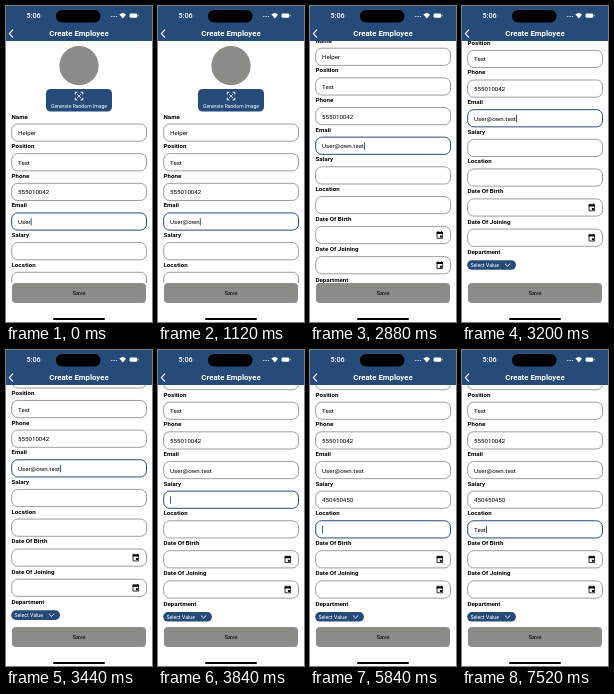
An HTML page that plays this animation: 146x316 px, repeating every 8 s.

```html
<!DOCTYPE html>
<html lang="en">
<head>
<meta charset="utf-8">
<title>Create Employee</title>
<style>
  html, body { margin: 0; width: 100%; height: 100%; overflow: hidden; background: #fff; }
  svg { display: block; width: 146px; height: 316px; font: 6.2px Roboto, sans-serif; }
  .label { font-weight: 700; }
  .box { fill: #fff; stroke: #858585; stroke-width: .8; }
  .box.focused { stroke: #264b78; stroke-width: 1; }
  .blue { fill: #264b78; }
  .gray { fill: #8b8b87; }
  .white { fill: #fff; }
  .line { fill: none; stroke: #fff; stroke-linecap: round; stroke-linejoin: round; }
</style>
</head>
<body>
<svg viewBox="0 0 146 316">
  <defs>
    <clipPath id="view"><rect y="35" width="146" height="242"/></clipPath>
    <g id="calendar">
      <path d="M-2.8-2.8h5.6v6h-5.6z" fill="none" stroke="#000" stroke-width=".8"/>
      <path d="M-3.2-3.2h6.4v2h-6.4zM-2.2-4h.9v1h-.9zM1.3-4h.9v1h-.9zM.1.4h2v2h-2z"/>
    </g>
  </defs>

  <g clip-path="url(#view)">
    <g id="form">
      <circle class="gray" cx="73" cy="59.7" r="19.6"/>
      <rect class="blue" x="40" y="83" width="66" height="22.5" rx="4.5"/>
      <g class="line" stroke-width="1">
        <path d="M69.2 88v-1.7h1.7M75.1 86.3h1.7V88M76.8 92.2v1.7h-1.7M70.9 93.9h-1.7v-1.7"/>
        <path d="M71.2 88.3l3.6 3.6M74.8 88.3l-3.6 3.6" stroke-width=".8"/>
      </g>
      <text class="white" x="73" y="102" font-size="5.1" text-anchor="middle">Generate Random Image</text>
    </g>
  </g>

  <rect class="gray" x="6" y="277" width="134" height="20" rx="4"/>
  <text x="73" y="289.3" text-anchor="middle">Save</text>
  <rect x="47" y="312" width="52" height="2" rx="1"/>

  <rect class="blue" width="146" height="35"/>
  <rect x="50" y="4" width="44.5" height="12.5" rx="6.2"/>
  <text class="white" x="20.5" y="12.4" font-size="7.2" font-weight="500">5:06</text>
  <g class="white">
    <circle cx="105.4" cy="10.6" r=".5"/><circle cx="107.1" cy="10.6" r=".5"/>
    <circle cx="108.8" cy="10.6" r=".5"/><circle cx="110.5" cy="10.6" r=".5"/>
    <path d="M113.4 8.6q3.4-3 6.8 0l-3.4 3.9z"/>
    <rect x="123.6" y="7.4" width="7.6" height="4.4" rx="1.2"/>
    <rect x="131.7" y="8.8" width=".7" height="1.6" rx=".3"/>
  </g>
  <path class="line" d="M6.7 24L3.3 27.6l3.4 3.6" stroke-width="1.1"/>
  <text class="white" x="73" y="30.2" font-size="7.8" font-weight="700" text-anchor="middle">Create Employee</text>
</svg>

<script>
const LOOP = 8000, FRAME = 80;
const form = document.getElementById('form');

function add(tag, attrs, text = '') {
  const node = document.createElementNS('http://www.w3.org/2000/svg', tag);
  for (const key in attrs) node.setAttribute(key, attrs[key]);
  node.textContent = text;
  return form.appendChild(node);
}

// y is the vertical centre of the label above each box
function addField(label, y, value = '') {
  add('text', { class: 'label', x: 5.5, y: y + 2.3 }, label);
  const box = add('rect', { class: 'box', x: 5.7, y: y + 7.8, width: 134.8, height: 17.2, rx: 6 });
  const text = add('text', { x: 12, y: y + 18.9 }, value);
  return { box, text, y };
}

const fields = ['Name', 'Position', 'Phone', 'Email', 'Salary', 'Location'].map((label, i) =>
  addField(label, 110.2 + i * 29.65, ['Helper', 'Test', '555010042'][i]));

[['Date Of Birth', 288.4], ['Date Of Joining', 318.6]].forEach(([label, y]) => {
  addField(label, y);
  add('use', { href: '#calendar', x: 129.8, y: y + 16.5 });
});

add('text', { class: 'label', x: 5.5, y: 351.6 }, 'Department');
add('rect', { class: 'blue', x: 5.2, y: 357.5, width: 48.8, height: 9.6, rx: 4.8 });
add('text', { class: 'white', x: 8.5, y: 364.2, 'font-size': 5.2 }, 'Select Value');
add('path', { class: 'line', d: 'M43.3 361.3l2.3 2.2 2.3-2.2', 'stroke-width': .9 });
const caret = add('rect', { class: 'blue', width: .9, height: 7.4 });

// Each session takes focus at `start`; `keys` are the times of further key presses
const sessions = [
  { field: fields[3], start: 0, value: 'User@own.test', typed: 4,
    keys: [320, 960, 1040, 1120, 1200, 1760, 1920, 2000, 2160] },
  { field: fields[4], start: 3840, value: '450450450', typed: 0,
    keys: [4240, 4320, 4400, 4560, 4720, 4800, 4880, 5040, 5120] },
  { field: fields[5], start: 5360, value: 'Test', typed: 0,
    keys: [7120, 7280, 7360, 7520] }
];

const scrollKeys = [[2640, 0], [2720, 16], [2800, 48], [2880, 75.8], [2960, 92], [3040, 100],
  [3120, 103.4], [3200, 103.3], [3280, 101], [3360, 98.8], [3440, 97.2], [3520, 96.2], [3680, 95.5]];
const caretKeys = [[1519, 1], [1520, 0], [1759, 0], [1760, 1],
  [6000, 1], [6160, 0], [6240, 0], [6320, .5], [6400, .5], [6480, 1]];

function interpolate(keys, t) {
  const i = keys.findIndex(([time]) => time > t);
  if (i < 0) return keys[keys.length - 1][1];
  if (i === 0) return keys[0][1];
  const [[t0, a], [t1, b]] = [keys[i - 1], keys[i]];
  return a + (b - a) * (t - t0) / (t1 - t0);
}

function render(t) {
  const active = sessions.filter(s => s.start <= t).pop();
  for (const s of sessions) {
    const count = s.typed + s.keys.filter(key => key <= t).length;
    s.field.text.textContent = s.value.slice(0, count);
    s.field.box.classList.toggle('focused', s === active);
  }
  const { text, y } = active.field;
  const width = text.textContent ? text.getComputedTextLength() : 0;
  caret.setAttribute('x', 12.1 + width);
  caret.setAttribute('y', y + 13);
  caret.setAttribute('opacity', interpolate(caretKeys, t));
  form.setAttribute('transform', `translate(0 ${-interpolate(scrollKeys, t)})`);
}

const begin = performance.now();
function tick() {
  const t = (performance.now() - begin) % LOOP;
  render(Math.floor(t / FRAME) * FRAME);
  requestAnimationFrame(tick);
}
tick();
</script>
</body>
</html>
```
